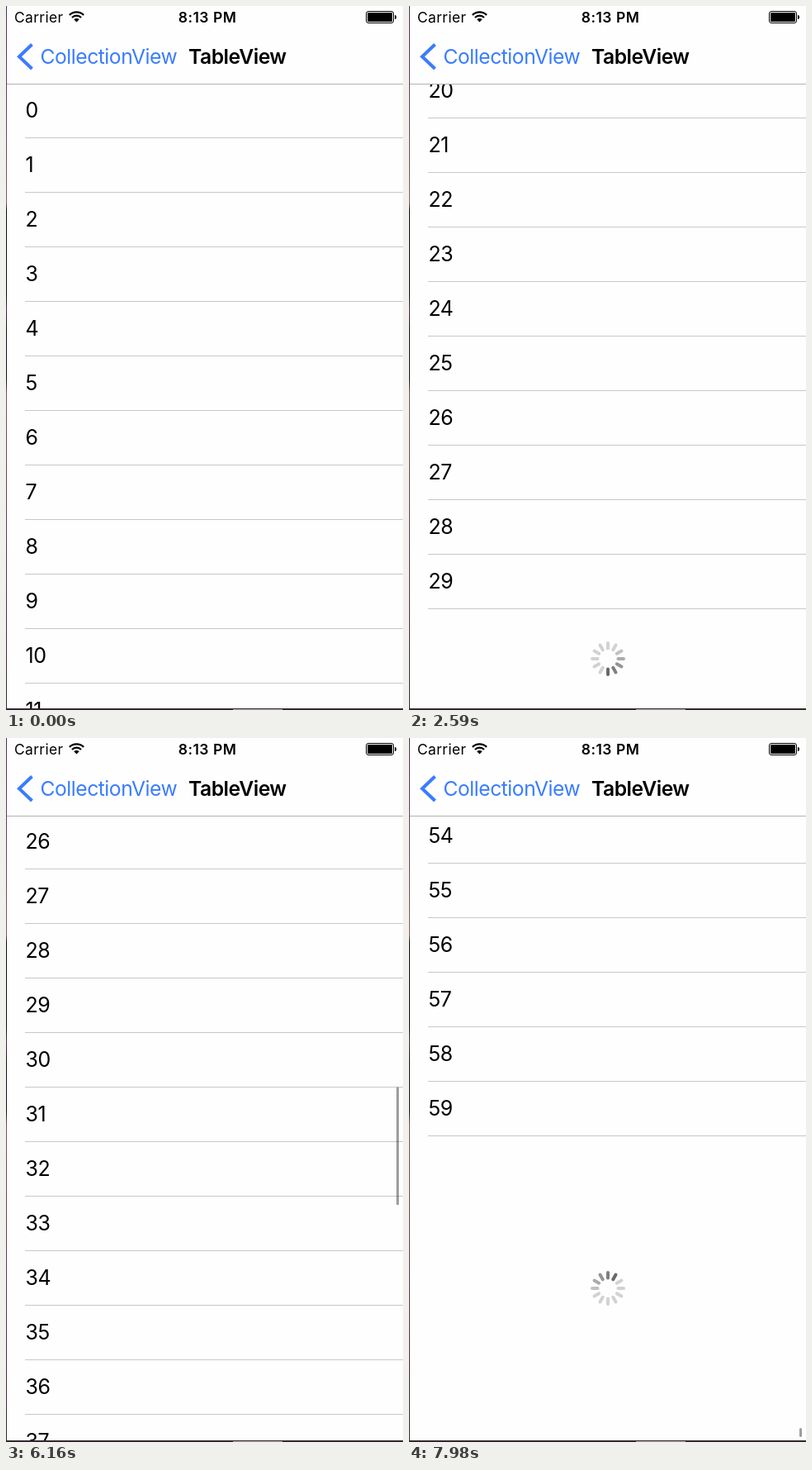
Animation, 481 px wide and 852 px high, one loop 8000 ms. Source, as an HTML page with a canvas:

```html
<!DOCTYPE html>
<html lang="en">
<head>
<meta charset="utf-8">
<title>Table view with load-more spinner</title>
<style>
  html, body { margin: 0; width: 100%; height: 100%; overflow: hidden; background: #fff; }
  canvas { display: block; }
</style>
</head>
<body>
<canvas id="stage" width="481" height="852"></canvas>
<script>
const ctx = document.getElementById('stage').getContext('2d');
const LOOP = 8000, TICK = 70;
const TOP = 94, BOTTOM = 851, VIEW = BOTTOM - TOP;
const ROW = 66, FOOTER = 122;
const TRACK_TOP = 98, TRACK = 748;
const BLUE = '#3a7cff';

// Spinner runs, first rows loaded, bar fades
const FIRST_SPIN = 1015, LOADED = 4970, SECOND_SPIN = 6830, SPIN_STEP = 86;
const FADE_START = 1750, FADE_TIME = 280;

// Scroll position as [time, offset]: fling, bounce, rest, fling, bounce, drag
const SCROLL = [
  [490, 0], [560, 250], [700, 710], [840, 1055], [980, 1325], [1050, 1409],
  [1120, 1445], [1190, 1430], [1330, 1370], [1470, 1348], [1610, 1344],
  [6090, 1344], [6160, 1717], [6300, 2245], [6440, 2645], [6580, 2945],
  [6720, 3174], [6790, 3265], [6860, 3335], [6930, 3385], [7000, 3405],
  [7140, 3375], [7280, 3340], [7420, 3330], [7560, 3420], [7700, 3522],
  [7770, 3522], [7980, 3572]
];

const clamp = (v, lo = 0, hi = 1) => Math.min(hi, Math.max(lo, v));

function scrollAt(t) {
  const i = SCROLL.findIndex(key => key[0] >= t);
  if (i < 1) return SCROLL[0][1];
  const [t0, a] = SCROLL[i - 1], [t1, b] = SCROLL[i];
  return Math.round(a + (b - a) * (t - t0) / (t1 - t0));
}

function box(x, y, w, h, color) {
  ctx.fillStyle = color;
  ctx.fillRect(x, y, w, h);
}

function roundBox(x, y, w, h, r, color) {
  ctx.fillStyle = color;
  ctx.beginPath();
  ctx.roundRect(x, y, w, h, r);
  ctx.fill();
}

function text(str, x, y, size, { weight = 400, color = '#000', spacing = -0.5, align = 'left' } = {}) {
  ctx.font = `${weight} ${size}px Inter, "Liberation Sans", sans-serif`;
  ctx.letterSpacing = spacing + 'px';
  ctx.textAlign = align;
  ctx.fillStyle = color;
  ctx.fillText(str, x, y);
}

function arm(cy, index, width, gray, alpha = 1) {
  ctx.save();
  ctx.translate(241, cy);
  ctx.rotate(index * Math.PI / 6);
  ctx.globalAlpha = alpha;
  roundBox(-width / 2, -21, width, 10.5, width / 2, `rgb(${gray},${gray},${gray})`);
  ctx.restore();
}

const armGray = lag => Math.min(210, 105 + 22 * lag);

function spinner(cy, head) {
  for (let i = 0; i < 12; i++) arm(cy, i, 4, armGray(((head - i) % 12 + 12) % 12));
}

// Arms appear one by one while the footer is pulled into view
function partialSpinner(cy, progress) {
  const count = Math.floor(progress * 12);
  for (let i = 0; i < count; i++) {
    arm(cy, 9 - i, 4 - 1.8 * i / count, armGray(1.2 + i * 0.6), 0.75);
  }
}

function scrollBar(offset, content, alpha) {
  const max = content - VIEW;
  const full = TRACK * VIEW / content;
  const over = Math.max(0, offset - max);
  const length = Math.max(11, full - over);
  const end = TRACK_TOP + full + Math.min(1, offset / max) * (TRACK - full);
  ctx.globalAlpha = alpha;
  roundBox(473, end - length, 3, length, 1.5, 'rgba(0,0,0,0.38)');
  ctx.globalAlpha = 1;
}

function table(t) {
  const offset = scrollAt(t);
  const rows = t < LOADED ? 30 : 60;
  const start = t < LOADED ? FIRST_SPIN : SECOND_SPIN;
  const loading = t >= start;
  const first = Math.floor(offset / ROW);

  for (let n = first; n < Math.min(rows, first + 13); n++) {
    const line = 159 + n * ROW - offset;
    text(n, 23.5, line - 24, 25);
    box(23, line, 458, 1, '#c8c8ca');
  }

  const cy = (159 + (rows - 1) * ROW - offset + BOTTOM) / 2;
  if (loading) spinner(cy, Math.floor((t - start) / SPIN_STEP));
  else partialSpinner(cy, clamp((offset - rows * ROW + VIEW) / FOOTER));

  const moving = t >= 560 && t < LOADED || t >= 6160;
  const alpha = t < LOADED ? clamp(1 - (t - FADE_START) / FADE_TIME) : 1;
  if (moving && alpha > 0) scrollBar(offset, rows * ROW + (loading ? FOOTER : 0), alpha);
}

function statusBar() {
  text('Carrier', 10, 20, 17.5, { spacing: 0.3 });
  text('8:13 PM', 244, 20, 17.5, { weight: 600, spacing: 0.5, align: 'center' });

  ctx.strokeStyle = ctx.fillStyle = '#000';
  const from = -Math.PI * 0.75, to = -Math.PI * 0.25;
  ctx.beginPath();
  ctx.moveTo(85.5, 19.5);
  ctx.arc(85.5, 19.5, 4.5, from, to);
  ctx.fill();
  ctx.lineWidth = 2.2;
  for (const r of [7.8, 12.2]) {
    ctx.beginPath();
    ctx.arc(85.5, 19.5, r, from, to);
    ctx.stroke();
  }

  ctx.lineWidth = 1;
  ctx.beginPath();
  ctx.roundRect(436.5, 6.5, 33, 14, 2.5);
  ctx.stroke();
  roundBox(438, 8, 30, 11, 1, '#000');
  roundBox(471, 11, 2, 5, [0, 2, 2, 0], '#000');
}

function navBar() {
  box(1, 0, 480, TOP, '#fefefe');
  box(1, TOP, 480, 1, '#b2b2b2');
  statusBar();
  ctx.strokeStyle = BLUE;
  ctx.lineWidth = 4;
  ctx.beginPath();
  ctx.moveTo(31.5, 46.5);
  ctx.lineTo(16, 61.2);
  ctx.lineTo(31.5, 76);
  ctx.stroke();
  text('CollectionView', 41.5, 70, 24.7, { color: BLUE });
  text('TableView', 221, 70, 24.7, { weight: 600 });
}

// Sliver of desktop behind the window
function desktopEdge() {
  const edge = ctx.createLinearGradient(0, 0, 0, 852);
  const stops = [[0, '#4a3350'], [0.2, '#6b4a5c'], [0.28, '#8a5a50'], [0.29, '#0c0a10'],
    [0.41, '#0c0a10'], [0.43, '#4a2c40'], [0.46, '#151018'], [0.53, '#151018'],
    [0.55, '#7a5450'], [0.75, '#5a3d50'], [1, '#33242f']];
  for (const [at, color] of stops) edge.addColorStop(at, color);
  box(0, 0, 1, 852, edge);
  box(0, 850, 481, 2, '#33272f');
  box(275, 851, 60, 1, '#b5adb2');
}

function draw(now) {
  const t = Math.floor(now % LOOP / TICK) * TICK;
  box(0, 0, 481, 852, '#fefefe');
  table(t);
  navBar();
  desktopEdge();
}

const begin = performance.now();
function loop() {
  draw(performance.now() - begin);
  requestAnimationFrame(loop);
}
loop();
</script>
</body>
</html>
```
